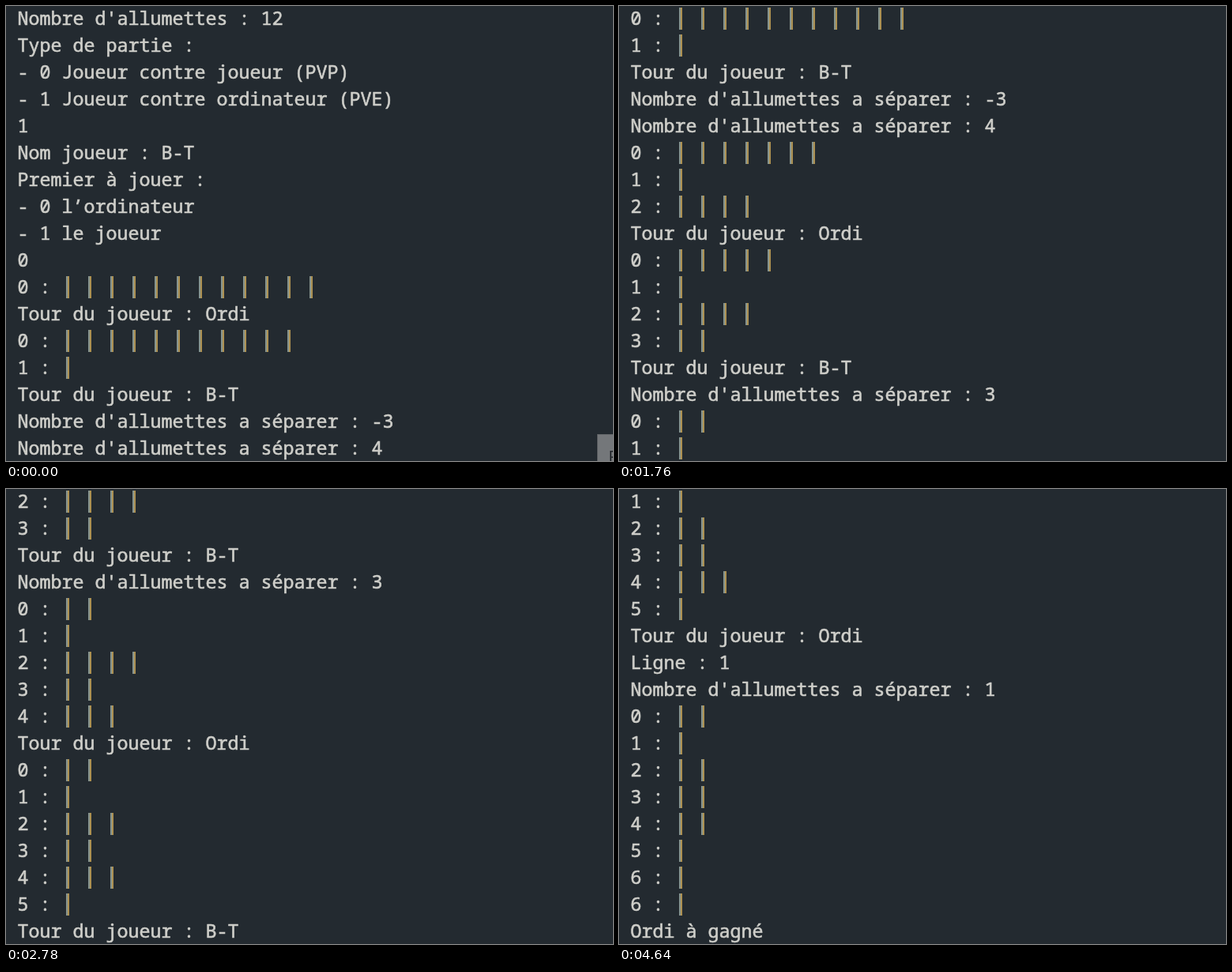
Recreate the animation shown at these times as an HTML page. Size 768x576 px, loop 5.8 s.

```html
<!DOCTYPE html>
<html lang="fr">
<head>
<meta charset="utf-8">
<title>Jeu d'allumettes</title>
<style>
  html, body { margin: 0; width: 100%; height: 100%; overflow: hidden; background: #232a30; }
  svg { display: block; width: 768px; height: 576px; }
  #log { font: 23.333px "Noto Sans Mono", "DejaVu Sans Mono", monospace; fill: #cfcfca; font-variant-ligatures: none; }
  #log text { stroke: #cfcfca; stroke-width: 0.6px; }
  #tip text { font: 22px "Open Sans", sans-serif; fill: #25292d; }
</style>
</head>
<body>
<svg viewBox="0 0 768 576">
  <rect width="768" height="576" fill="#232a30"/>
  <g id="log"></g>
  <g id="tip">
    <rect x="748" y="542" width="30" height="44" fill="#66696c"/>
    <rect x="749" y="543" width="29" height="43" fill="#74777a"/>
    <text x="762" y="579">F</text>
  </g>
</svg>
<script>
const NS = "http://www.w3.org/2000/svg";
const LOOP = 5800, ROW = 34, COL = 14, LEFT = 14;
const log = document.getElementById("log");
const tip = document.getElementById("tip");

const player = "B-T", computer = "Ordi";
const turn = name => "Tour du joueur : " + name;
const split = n => "Nombre d'allumettes a séparer : " + n;
const piles = (...counts) => counts.map((n, i) => ({ label: i + " :", n }));

const lines = [
  "Nombre d'allumettes : 12",
  "Type de partie :",
  "- 0 Joueur contre joueur (PVP)",
  "- 1 Joueur contre ordinateur (PVE)",
  "1",
  "Nom joueur : " + player,
  "Premier à jouer :",
  "- 0 l’ordinateur",
  "- 1 le joueur",
  "0",
  ...piles(12),
  turn(computer),
  ...piles(11, 1),
  turn(player), split(-3), split(4),
  ...piles(7, 1, 4),
  turn(computer),
  ...piles(5, 1, 4, 2),
  turn(player), split(3),
  ...piles(2, 1, 4, 2, 3),
  turn(computer),
  ...piles(2, 1, 3, 2, 3, 1),
  turn(player),
  ...piles(2, 1, 2, 2, 3, 1),
  turn(computer), "Ligne : 1", split(1),
  ...piles(2, 1, 2, 2, 2, 1, 1),
  { label: "6 :", n: 1 },
  computer + " à gagné"
];

// [start time, first visible line]
const scrolls = [[0, 0], [1160, 6], [1760, 12], [2320, 17], [2780, 23], [3240, 29], [3840, 35], [4640, 41]];
// [start time, opacity]
const fades = [[0, 1], [20, 0.66], [40, 0.33], [60, 0]];

function add(tag, attrs) {
  const el = document.createElementNS(NS, tag);
  for (const key in attrs) el.setAttribute(key, attrs[key]);
  return log.appendChild(el);
}

function match(x, y) {
  add("rect", { x: x, y, width: 2, height: 28, fill: "#87958f" });
  add("rect", { x: x + 2, y, width: 2, height: 28, fill: "#ad9152" });
}

lines.forEach((line, i) => {
  const y = i * ROW;
  add("text", { x: LEFT + 0.5, y: y + 23.5 }).textContent = line.label || line;
  for (let k = 0; k < (line.n || 0); k++) match(LEFT + COL * (4 + 2 * k) + 6, y + 2);
});

function valueAt(steps, t) {
  let value = steps[0][1];
  for (const [start, v] of steps) if (t >= start) value = v;
  return value;
}

function render(t) {
  log.setAttribute("transform", `translate(0 ${-ROW * valueAt(scrolls, t)})`);
  tip.setAttribute("opacity", valueAt(fades, t));
}

const origin = performance.now();
function tick() {
  render((performance.now() - origin) % LOOP);
  requestAnimationFrame(tick);
}
render(0);
requestAnimationFrame(tick);
</script>
</body>
</html>
```
